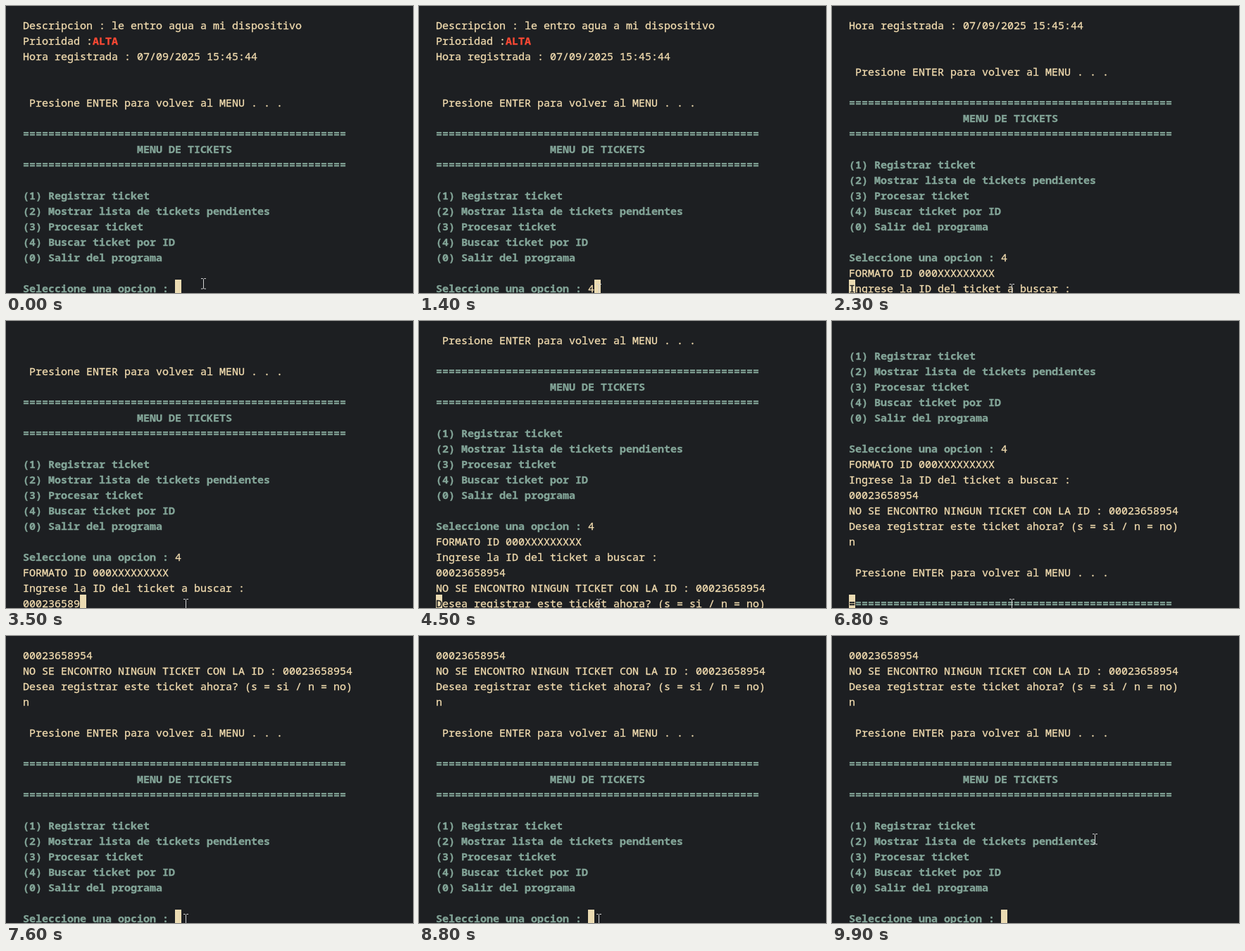
Write an HTML page that moves like this. It is 578 px wide and 408 px high and loops after 10 s.

```html
<!DOCTYPE html>
<html lang="es">
<head>
<meta charset="utf-8">
<title>Menu de tickets</title>
<style>
  html, body { margin: 0; width: 100%; height: 100%; overflow: hidden; background: #1d1f22; }
  #stage {
    position: relative; width: 578px; height: 408px; overflow: hidden;
    font: 15px/22px "Noto Sans Mono", "DejaVu Sans Mono", monospace;
    font-variant-ligatures: none; white-space: pre;
    color: #f3ddb0; -webkit-text-stroke: .3px;
  }
  #log { position: absolute; left: 24px; top: 16px; }
  #log div { height: 22px; }
  .menu { color: #83a598; font-weight: 700; }
  .high { color: #fb4934; font-weight: 700; }
  #caret {
    position: absolute; top: 389px; width: 9px; height: 22px;
    background: #ebdbb2; color: #1d1f22; line-height: 24px;
  }
  #mouse { position: absolute; left: 0; top: 0; width: 9px; height: 16px; }
</style>
</head>
<body>
<div id="stage">
  <div id="log"></div>
  <div id="caret"></div>
  <svg id="mouse" viewBox="0 0 9 16">
    <path d="M1 .5H3.5L4.5 1.5L5.5 .5H8M4.5 1.5V14M1 15H3.5L4.5 14L5.5 15H8" fill="none" stroke="#d2d2d2"/>
  </svg>
</div>
<script>
const LOOP = 10000, FRAME = 100, ROW = 22, COL = 9, LEFT = 24, ROWS = 18;
const log = document.getElementById('log');
const caret = document.getElementById('caret');
const mouse = document.getElementById('mouse');

const green = text => [[text, 'menu']];
const plain = text => [[text, '']];
const rule = '='.repeat(51);
const pause = ' Presione ENTER para volver al MENU . . .';
const prompt = 'Seleccione una opcion : ';
const ticketId = '00023658954';

const menu = [
  rule, ' '.repeat(18) + 'MENU DE TICKETS', rule, '',
  '(1) Registrar ticket',
  '(2) Mostrar lista de tickets pendientes',
  '(3) Procesar ticket',
  '(4) Buscar ticket por ID',
  '(0) Salir del programa', ''
].map(green);

const lines = [
  plain('Descripcion : le entro agua a mi dispositivo'),
  [['Prioridad :', ''], ['ALTA', 'high']],
  ...['Hora registrada : 07/09/2025 15:45:44', '', '', pause, ''].map(plain),
  ...menu,
  [[prompt, 'menu'], ['4', '']],
  ...['FORMATO ID 000XXXXXXXXX', 'Ingrese la ID del ticket a buscar :', ticketId,
    'NO SE ENCONTRO NINGUN TICKET CON LA ID : ' + ticketId,
    'Desea registrar este ticket ahora? (s = si / n = no)',
    'n', '', pause, ''].map(plain),
  ...menu,
  green(prompt)
];

// The session: keys pressed on the bottom line, then output pushed below it.
let bottom = ROWS - 1;
const steps = [{ at: 0, last: bottom, col: prompt.length }];
const inputs = new Map();

function type(at, text, start = 0) {
  inputs.set(bottom, { text, start });
  [...text].forEach((key, i) =>
    steps.push({ at: at + i * 100, last: bottom, col: start + i + 1 }));
}

function print(at, gap, count) {
  for (let i = 0; i < count; i++) {
    bottom++;
    const col = bottom === lines.length - 1 ? prompt.length : 0;
    steps.push({ at: at + i * gap, last: bottom, col });
  }
}

type(1300, '4', prompt.length);
print(1900, 250, 3);
type(2700, ticketId);
print(4100, 250, 3);
type(5900, 'n');
print(6560, 78, 14);

const rows = lines.map(parts => {
  const row = document.createElement('div');
  for (const [text, kind] of parts) {
    const span = document.createElement('span');
    span.className = kind;
    span.textContent = text;
    row.append(span);
  }
  log.append(row);
  return row;
});

function ease(t, from, to) {
  const k = Math.min(1, Math.max(0, (t - from) / (to - from)));
  return k * k * (3 - 2 * k);
}

function draw(t) {
  const { last, col } = steps.filter(s => s.at <= t).pop();
  const top = last - ROWS + 1;
  log.style.transform = `translateY(${-top * ROW}px)`;
  rows.forEach((row, i) => {
    row.style.visibility = i < top || i > last ? 'hidden' : 'visible';
  });
  inputs.forEach(({ text, start }, i) => {
    rows[i].lastChild.textContent = i === last ? text.slice(0, col - start) : text;
  });

  caret.style.left = LEFT + col * COL + 'px';
  caret.textContent = rows[last].textContent[col] || '';
  caret.style.fontWeight = lines[last][0][1] ? 700 : 400;

  const a = ease(t, 900, 1400), b = ease(t, 9300, 9900);
  const x = Math.round(276 - 25 * a + 118 * b);
  const y = Math.round(387 + 8 * a - 114 * b);
  mouse.style.transform = `translate(${x}px, ${y}px)`;
}

const begin = performance.now();
function tick() {
  const t = (performance.now() - begin) % LOOP;
  draw(Math.floor(t / FRAME) * FRAME);
  requestAnimationFrame(tick);
}
tick();
</script>
</body>
</html>
```
